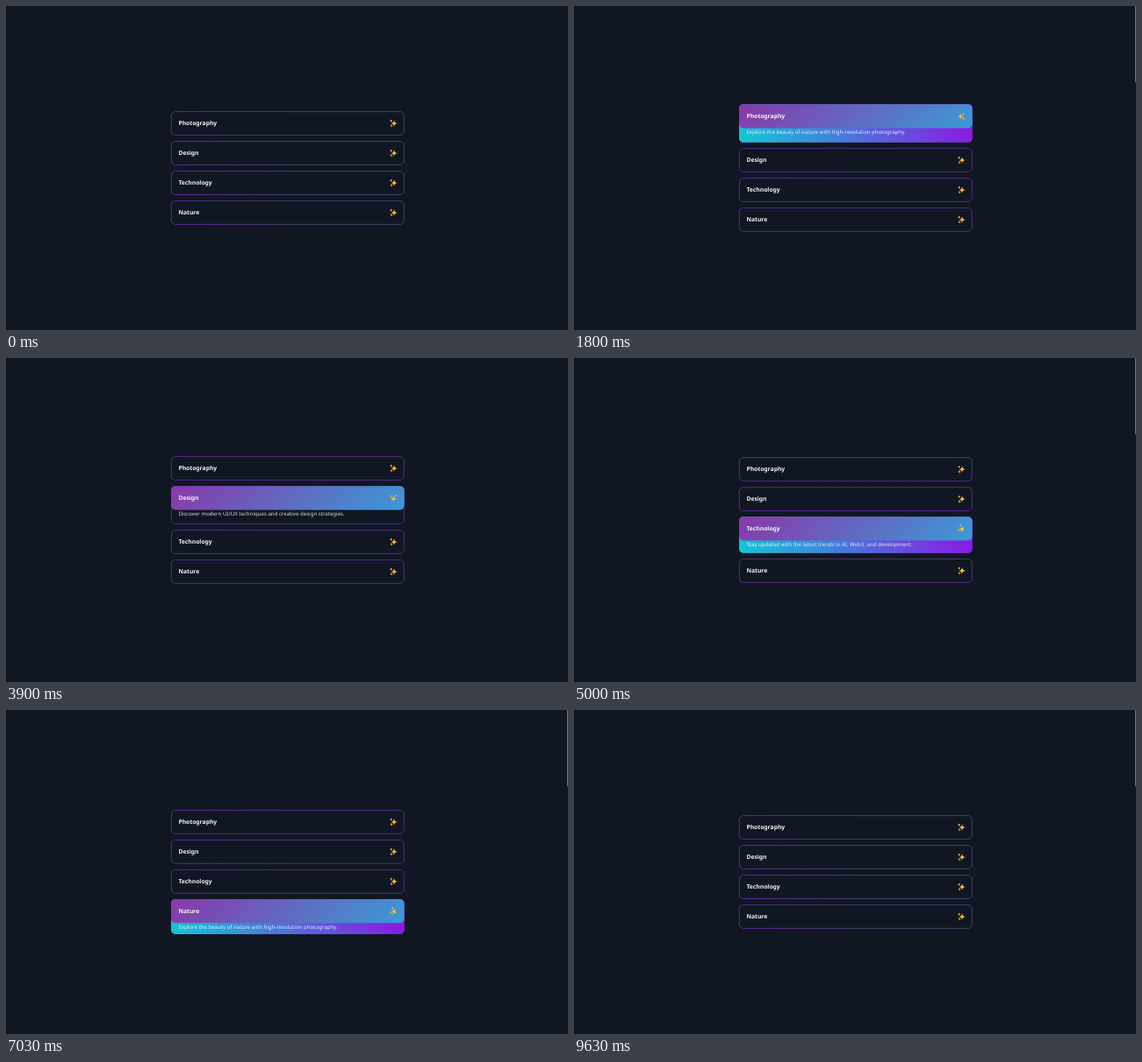
Recreate the animation shown at these times as an HTML page. Size 640x370 px, loop 9.9 s.

```html
<!DOCTYPE html>
<html lang="en">
<head>
<meta charset="utf-8">
<title>Accordion</title>
<style>
  html, body { margin: 0; width: 100%; height: 100%; overflow: hidden; background: #101723; }
  svg { display: block; width: 640px; height: 370px; }
  text { font-family: "Noto Sans", "Open Sans", sans-serif; text-rendering: geometricPrecision; }
  .title { font-size: 6.75px; font-weight: 700; fill: #f3f3f6; }
  .desc { font-size: 6.1px; fill: #fff; fill-opacity: .84; }
</style>
</head>
<body>
<svg id="stage" viewBox="0 0 640 370">
  <defs>
    <linearGradient id="edge">
      <stop offset="0" stop-color="#6a27ae"/>
      <stop id="edgeEnd" offset=".5"/>
    </linearGradient>
    <linearGradient id="head" gradientUnits="userSpaceOnUse" x1="59.5" y1="-59.5" x2="206" y2="87">
      <stop offset="0" stop-color="#8a38a9"/>
      <stop offset="1" stop-color="#3a9ad7"/>
    </linearGradient>
    <linearGradient id="body" gradientUnits="userSpaceOnUse" x1="55.5" y1="99" x2="210" y2="-55.5">
      <stop offset="0" stop-color="#10cbd4"/>
      <stop offset=".88" stop-color="#8a1be2"/>
    </linearGradient>
    <linearGradient id="gold" x1="0" y1="0" x2="0" y2="1">
      <stop offset="0" stop-color="#fdc84b"/>
      <stop offset="1" stop-color="#f6a62c"/>
    </linearGradient>
  </defs>
  <rect id="bar" x="639" y="0" width="1" height="87" fill="#777a81"/>
</svg>
<script>
const LOOP = 9900, LEFT = 188, WIDTH = 265.6, ROW = 27.6, GAP = 6.4, PANEL = 16;
const MAX_HEIGHT = 200, SLIDE = 500, FADE = 300;

const items = [
  { title: "Photography", desc: "Explore the beauty of nature with high-resolution photography.",
    hover: 800, open: 1130, close: 1830, leave: 2130 },
  { title: "Design", desc: "Discover modern UI/UX techniques and creative design strategies.",
    hover: 2800, open: 3130, close: 3810, leave: 4230 },
  { title: "Technology", desc: "Stay updated with the latest trends in AI, Web3, and development.",
    hover: 4670, open: 4960, close: 5690, leave: 6100 },
  { title: "Nature", desc: "Explore the beauty of nature with high-resolution photography.",
    hover: 6670, open: 6993, close: 8390, leave: 8800 }
];

// time, border gradient turn, how far purple reaches
const edgeKeys = [
  [0, 0, 0], [800, 0, 0], [1200, 0, .8], [4670, 0, .8], [4980, 1, .1],
  [5670, 1, .1], [6200, 0, .8], [7670, 0, .8], [8000, 0, 0], [LOOP, 0, 0]
];
const barGaps = [[0, 200], [3770, 3970], [7600, 7800]];

const clamp = v => Math.min(1, Math.max(0, v));
const mix = (a, b, k) => a + (b - a) * k;
const $ = id => document.getElementById(id);

// cubic-bezier(.25, .1, .25, 1)
function ease(p) {
  p = clamp(p);
  if (p === 0 || p === 1) return p;
  const curve = (a, b, u) => 3 * a * u * (1 - u) ** 2 + 3 * b * u * u * (1 - u) + u ** 3;
  let lo = 0, hi = 1;
  for (let i = 0; i < 24; i++) {
    const mid = (lo + hi) / 2;
    if (curve(.25, .25, mid) < p) lo = mid; else hi = mid;
  }
  return curve(.1, 1, lo);
}

const pulse = (t, on, off, span) => ease((t - on) / span) - ease((t - off) / span);

function add(parent, tag, attrs, text) {
  const el = document.createElementNS("http://www.w3.org/2000/svg", tag);
  for (const key in attrs) el.setAttribute(key, attrs[key]);
  if (text) el.textContent = text;
  parent.appendChild(el);
  return el;
}

function star(x, y, r) {
  const q = r * .1;
  return `M${x} ${y - r}Q${x + q} ${y - q} ${x + r} ${y}Q${x + q} ${y + q} ${x} ${y + r}` +
    `Q${x - q} ${y + q} ${x - r} ${y}Q${x - q} ${y - q} ${x} ${y - r}Z`;
}
const sparkles = star(.8, 0, 3.8) + star(-2.6, -2.8, 1.6) + star(-2.2, 2.8, 1.8);

items.forEach((item, i) => {
  const g = item.group = add($("stage"), "g", {});
  const clip = add(g, "clipPath", { id: "clip" + i });
  item.clip = add(clip, "rect", { width: WIDTH, height: ROW });
  item.border = add(g, "rect", { x: .4, y: .4, width: WIDTH - .8, height: ROW - .8, rx: 4.4,
    fill: "none", stroke: "url(#edge)", "stroke-width": .8 });
  item.body = add(g, "rect", { width: WIDTH, height: ROW, rx: 4.8, fill: "url(#body)" });
  add(g, "text", { class: "desc", x: 8.4, y: 34, "clip-path": `url(#clip${i})` }, item.desc);
  item.head = add(g, "rect", { width: WIDTH, height: 27.2, rx: 4.8, fill: "url(#head)" });
  add(g, "text", { class: "title", x: 8.4, y: 16.2 }, item.title);
  item.icon = add(g, "path", { d: sparkles, fill: "url(#gold)" });
});

function drawEdge(t) {
  const n = edgeKeys.findIndex(k => k[0] > t);
  const a = edgeKeys[n - 1], b = edgeKeys[n];
  const k = (t - a[0]) / (b[0] - a[0]);
  const turn = mix(a[1], b[1], k), glow = mix(a[2], b[2], k);
  const edge = $("edge");
  edge.setAttribute("y1", turn);
  edge.setAttribute("x2", 1 - turn);
  edge.setAttribute("y2", 0);
  const rgb = [[78, 96], [70, 42], [112, 156]].map(c => Math.round(mix(c[0], c[1], glow)));
  $("edgeEnd").setAttribute("stop-color", `rgb(${rgb})`);
}

function draw(t) {
  drawEdge(t);
  $("bar").style.display = barGaps.some(([a, b]) => t >= a && t < b) ? "none" : "";

  const heights = items.map(it => ROW + Math.min(PANEL, MAX_HEIGHT * pulse(t, it.open, it.close, SLIDE)));
  const total = heights.reduce((sum, h) => sum + h, GAP * (items.length - 1));
  let y = 185 - total / 2;

  items.forEach((it, i) => {
    const h = heights[i];
    it.group.setAttribute("transform", `translate(${LEFT} ${y})`);
    it.clip.setAttribute("height", h > ROW + .01 ? h : 0);
    it.border.setAttribute("height", h - .8);
    it.body.setAttribute("height", h);
    it.body.style.display = t >= it.open && t < it.close ? "" : "none";
    it.head.setAttribute("opacity", pulse(t, it.hover, it.leave, FADE));
    it.icon.setAttribute("transform", `translate(253.2 13.8) rotate(${180 * pulse(t, it.open, it.close, FADE)})`);
    y += h + GAP;
  });
}

const start = performance.now();
function tick() {
  draw((performance.now() - start) % LOOP);
  requestAnimationFrame(tick);
}
tick();
</script>
</body>
</html>
```
